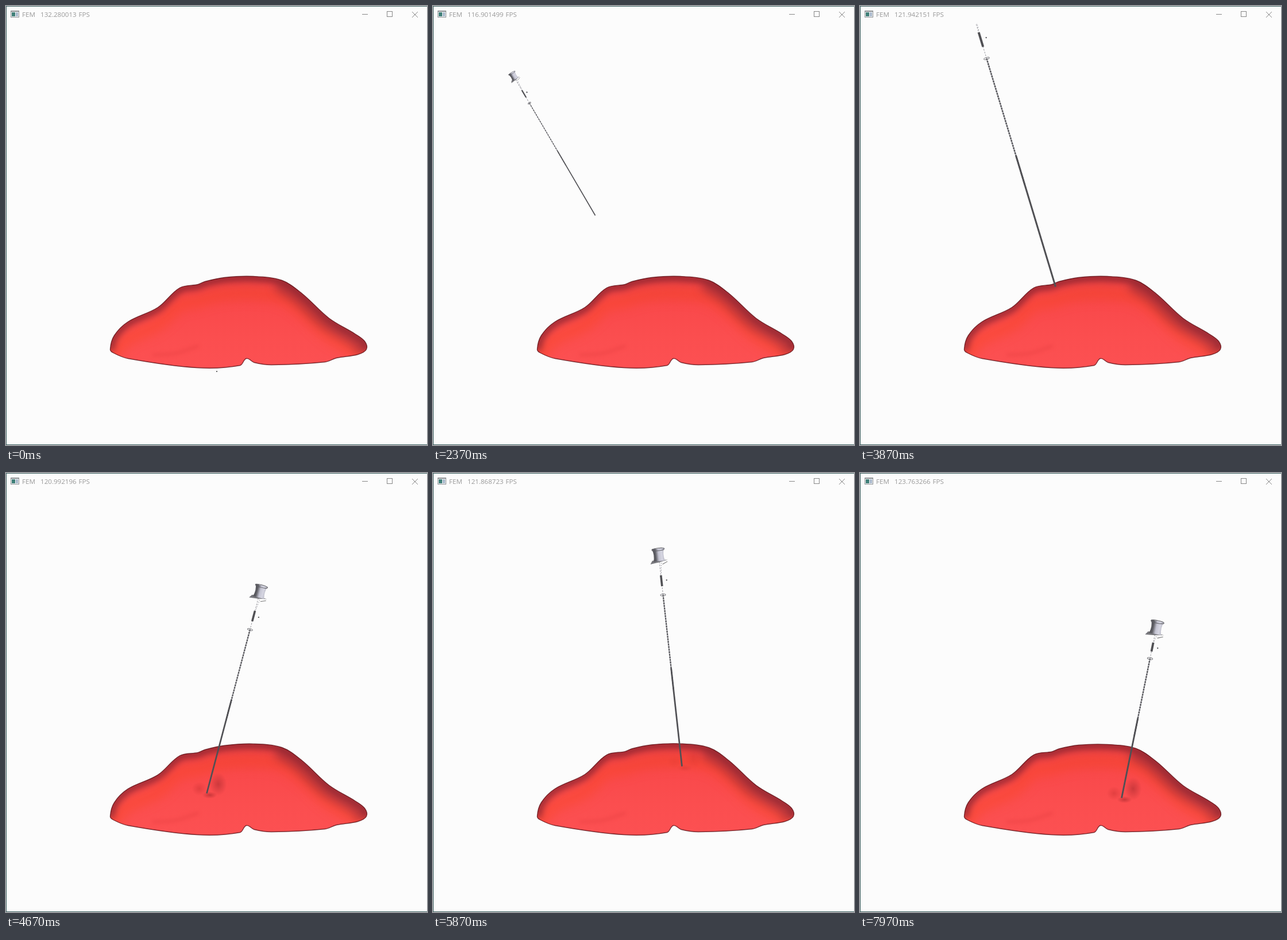
These frames come from a looping animation (733 by 764 pixels, 8000 ms). An HTML page with a canvas:

```html
<!DOCTYPE html>
<html lang="en">
<head>
<meta charset="utf-8">
<title>FEM</title>
<style>
  html, body { margin: 0; width: 100%; height: 100%; overflow: hidden; background: #fcfcfc; }
  canvas { display: block; }
</style>
</head>
<body>
<canvas id="stage" width="733" height="764"></canvas>
<script>
const ctx = document.getElementById('stage').getContext('2d');
const W = 733, H = 764, LOOP = 8000, BAR = 30;
const STEEL = '#505054';

const POSES = [
  { at: 850, tip: [262, 318], head: [138, 92], size: .58 },
  { at: 2370, tip: [282, 364], head: [136, 115], size: .6 },
  { at: 3870, tip: [340, 488], head: [187, -18], size: 1.1 },
  { at: 4670, tip: [349, 557], head: [445, 194], size: 1 },
  { at: 5870, tip: [433, 510], head: [391, 130], size: 1 },
  { at: 7070, tip: [411, 470], head: [434, 74], size: 1 },
  { at: 7970, tip: [455, 565], head: [518, 256], size: 1.05 }
];

// The title shows a new rate once per second
const RATES = ['132.280013', '118.412765', '116.901499', '119.735208', '121.942151',
  '120.992196', '121.868723', '120.667585', '123.763266'];

const CREST = [
  [181,597], [188,573], [212,549], [264,524], [302,490], [334,484], [346,479], [380,472],
  [430,470], [480,477], [515,500], [562,543], [607,570], [624,583], [627,597]
];
const UNDERSIDE = [
  [612,606], [575,612], [555,619], [462,624], [432,620],
  [418,613], [407,625], [332,629], [212,613], [186,603]
];

const clamp = v => Math.max(0, Math.min(1, v));
const ease = u => u * u * (3 - 2 * u);
const mix = (a, b, u) => a + (b - a) * u;
const mixPoint = (p, q, u) => p.map((v, i) => mix(v, q[i], u));

function poseAt(t) {
  if (t < POSES[0].at) return null;
  const i = POSES.findIndex(p => p.at > t);
  const b = POSES[i < 0 ? POSES.length - 1 : i];
  const a = POSES[(i < 0 ? POSES.length : i) - 1];
  const u = ease(clamp((t - a.at) / (b.at - a.at)));
  const tip = mixPoint(a.tip, b.tip, u);
  return {
    tip,
    head: mixPoint(a.head, b.head, u),
    size: mix(a.size, b.size, u),
    press: clamp((tip[1] - 488) / 70)
  };
}

// Curve through all points, its handles a third of each chord
function smoothPath(points, closed = false) {
  const path = new Path2D(), n = points.length;
  const at = i => closed ? points[(i + n) % n] : points[Math.max(0, Math.min(n - 1, i))];
  const handle = (i, reach) => {
    const p = at(i), a = at(i - 1), b = at(i + 1);
    const k = reach / Math.hypot(b[0] - a[0], b[1] - a[1]);
    return [p[0] + (b[0] - a[0]) * k, p[1] + (b[1] - a[1]) * k];
  };
  path.moveTo(...points[0]);
  for (let i = 0; i < (closed ? n : n - 1); i++) {
    const p = at(i), q = at(i + 1);
    const third = Math.hypot(q[0] - p[0], q[1] - p[1]) / 3;
    path.bezierCurveTo(...handle(i, third), ...handle(i + 1, -third), ...q);
  }
  if (closed) path.closePath();
  return path;
}

function gradient(x0, y0, x1, y1, ...colors) {
  const g = ctx.createLinearGradient(x0, y0, x1, y1);
  colors.forEach((c, i) => g.addColorStop(i / (colors.length - 1), c));
  return g;
}

function glow(x, y, rx, ry, rgb, alpha) {
  ctx.save();
  ctx.translate(x, y);
  ctx.scale(rx, ry);
  const g = ctx.createRadialGradient(0, 0, 0, 0, 0, 1);
  g.addColorStop(0, `rgba(${rgb},${alpha})`);
  g.addColorStop(1, `rgba(${rgb},0)`);
  ctx.fillStyle = g;
  ctx.fillRect(-1, -1, 2, 2);
  ctx.restore();
}

function softStroke(points, dx, dy, width, blur, color) {
  ctx.save();
  ctx.translate(dx, dy);
  ctx.filter = `blur(${blur}px)`;
  ctx.lineWidth = width;
  ctx.strokeStyle = color;
  ctx.stroke(smoothPath(points));
  ctx.restore();
}

function drawDent({ tip: [x, y], press }) {
  glow(x + 20, y - 16, 15, 20, '150,35,40', .45 * press);
  glow(x - 13, y - 8, 13, 12, '185,40,40', .35 * press);
  glow(x + 5, y + 3, 13, 6, '140,30,35', .45 * press);
}

function drawTissue(pose) {
  const press = pose ? pose.press : 0;
  const sink = ([x, y]) => [x, y + 2 * press * Math.exp(-(((x - pose.tip[0]) / 90) ** 2))];
  const crest = press ? CREST.map(sink) : CREST;
  const slope = crest.slice(9);
  const body = smoothPath([...crest, ...UNDERSIDE], true);

  ctx.save();
  ctx.translate(.5, .5);
  ctx.save();
  ctx.clip(body);
  ctx.fillStyle = gradient(0, 470, 0, 629, '#ec4244', '#f9494b', '#fb4e4f', '#fc5052');
  ctx.fillRect(170, 460, 470, 180);

  softStroke(crest, 0, 30, 22, 9, 'rgba(250,68,24,.35)');
  softStroke(crest, 0, 2, 12, 6, 'rgba(115,28,42,.75)');
  softStroke(slope, -9, 7, 20, 8, 'rgba(130,36,48,.5)');
  softStroke([[255, 607], [295, 604], [335, 591]], 0, 0, 4, 3, 'rgba(215,50,55,.3)');
  if (press) drawDent(pose);
  ctx.restore();

  ctx.lineWidth = 1.4;
  ctx.strokeStyle = 'rgba(95,18,24,.8)';
  ctx.stroke(body);
  ctx.restore();
}

function line(x0, y0, x1, y1, width, color, dash = []) {
  ctx.lineWidth = width;
  ctx.strokeStyle = color;
  ctx.setLineDash(dash);
  ctx.beginPath();
  ctx.moveTo(x0, y0);
  ctx.lineTo(x1, y1);
  ctx.stroke();
  ctx.setLineDash([]);
}

function ring(y, rx, ry, color) {
  ctx.lineWidth = 1;
  ctx.strokeStyle = color;
  ctx.beginPath();
  ctx.ellipse(0, y, rx, ry, 0, 0, 2 * Math.PI);
  ctx.stroke();
}

function drawHead(s) {
  ctx.save();
  ctx.scale(s, s);
  // flange
  ctx.fillStyle = '#77777c';
  ctx.beginPath();
  ctx.moveTo(-16, 27);
  ctx.lineTo(-12, 21);
  ctx.lineTo(15, 22);
  ctx.lineTo(0, 25);
  ctx.fill();
  line(5, 29, 14, 25, 1, '#777');

  // spool
  ctx.fillStyle = gradient(-11, 0, 11, 0, '#55555a', '#5c5c62', '#c4c4d2', '#d6d6e2', '#b4b4c0');
  ctx.beginPath();
  ctx.moveTo(-11, 1);
  ctx.lineTo(11, 1);
  ctx.quadraticCurveTo(6.5, 11, 10, 23);
  ctx.lineTo(-10, 23);
  ctx.quadraticCurveTo(-6.5, 11, -11, 1);
  ctx.fill();
  ring(2.5, 11, 2.3, '#606066');
  ctx.restore();
}

// Local frame: head at the origin, tip straight down at (0, length)
function drawTool({ tip, head, size }) {
  const dx = tip[0] - head[0], dy = tip[1] - head[1];
  const length = Math.hypot(dx, dy);
  const y = part => length * (1 - part);
  const width = Math.max(1.4, 2.7 * size);

  ctx.save();
  ctx.beginPath();
  ctx.rect(1, BAR, W - 1, H - BAR);
  ctx.clip();
  ctx.translate(head[0] + .5, head[1] + .5);
  ctx.rotate(Math.atan2(dy, dx) - Math.PI / 2);

  // shaft: speckled near the head, solid near the tip
  line(0, y(.785), 0, y(.35), width * .8, '#a9a9ae');
  line(0, y(.785), 0, y(.35), width * .8, STEEL, [2.5, 2]);
  line(0, y(.45), 0, length, width, STEEL);

  // neck and collar
  line(0, 24 * size, 0, y(.785), 1, '#9a9aa0', [3, 2]);
  line(3 * size, 26 * size, 1, y(.88), 1, '#aaaab0', [2, 2]);
  line(0, y(.875), 0, y(.825), 3.6 * size, STEEL);
  ring(y(.785), 4.5 * size, 1.6 * size, '#77777c');
  ctx.fillStyle = STEEL;
  ctx.fillRect(8 * size, y(.853), 2, 2);

  drawHead(size);
  ctx.restore();
}

function box(color, x, y, w, h) {
  ctx.fillStyle = color;
  ctx.fillRect(x, y, w, h);
}

function drawWindow(t) {
  const edge = '#3c6060';
  box(edge, 0, 0, W, 1);
  box(edge, 0, 0, 1, H);
  box(edge, 0, H - 1, W, 1);

  box('#8b8f92', 8, 8, 15, 12);
  box('#f4f5f6', 9, 10, 13, 9);
  box('#3f7f78', 10, 11, 6, 7);
  box('#a9b9cc', 17, 11, 4, 7);

  ctx.fillStyle = '#999';
  ctx.font = '11.6px "Open Sans", "Noto Sans", sans-serif';
  ctx.fillText('FEM', 28, 19);
  ctx.fillText(RATES[Math.floor((t + 400) / 1000)], 60, 19);
  ctx.fillText('FPS', 126.5, 19);

  const ink = '#888';
  line(620, 14.5, 630, 14.5, 1, ink);
  ctx.strokeRect(663.5, 9.5, 9, 9);
  line(707, 10, 717, 20, 1, ink);
  line(717, 10, 707, 20, 1, ink);
}

const start = performance.now();

function frame() {
  const t = (performance.now() - start) % LOOP;
  const pose = poseAt(t);
  box('#fcfcfc', 0, 0, W, H);
  drawTissue(pose);
  if (pose) drawTool(pose);
  else box('#666', 366, 635, 2, 2);
  drawWindow(t);
  requestAnimationFrame(frame);
}

frame();
</script>
</body>
</html>
```
